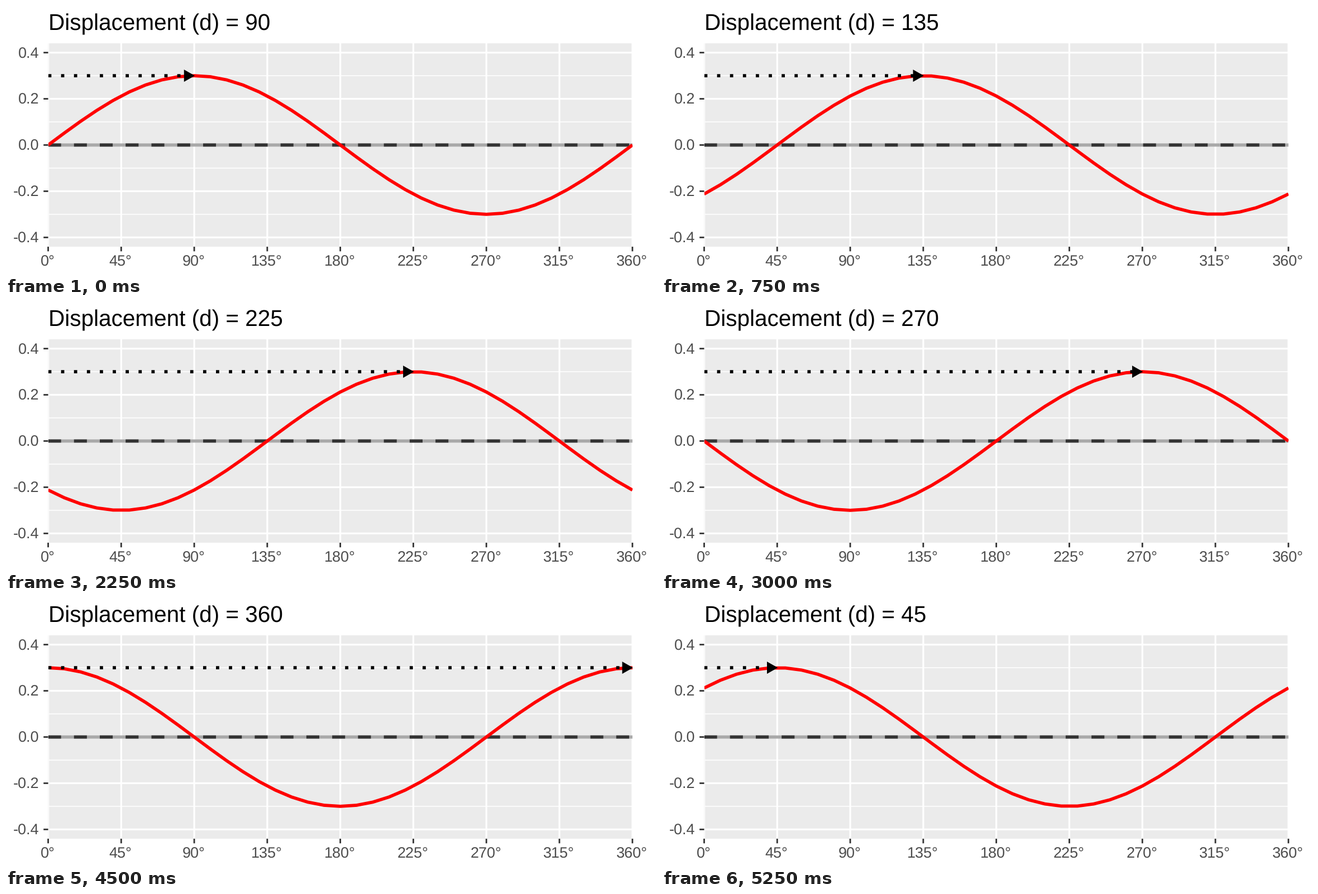
Animation of 1164x481 px, one loop 6000 ms. Source, as a matplotlib script:

```python
import numpy as np
import matplotlib.pyplot as plt
from matplotlib.animation import FuncAnimation
from matplotlib.patches import Polygon, Rectangle

W, H, DPI = 1164, 481, 64
PT = 72 / DPI  # points per pixel
LEFT, RIGHT, TOP, BOTTOM = 75.5, 1121.8, 67, 432
MID = (TOP + BOTTOM) / 2
AMP = 0.3
LINE = 5.78
GRID = 3.2
TICK = 8.3
STEP, FRAMES = 45, 8

plt.rcParams["font.family"] = "Liberation Sans"
plt.rcParams["text.hinting"] = "no_hinting"
plt.rcParams["path.snap"] = False


def px(deg):
    return LEFT + deg * (RIGHT - LEFT) / 360


def py(value):
    return MID - value * 414.6


fig = plt.figure(figsize=(W / DPI, H / DPI), dpi=DPI, facecolor="white")
ax = fig.add_axes([0, 0, 1, 1])
ax.set_xlim(0, W)
ax.set_ylim(H, 0)
ax.axis("off")

panel = Rectangle((LEFT, TOP), RIGHT - LEFT, BOTTOM - TOP, fc="#EBEBEB", lw=0)
ax.add_patch(panel)


def line(xs, ys, color, width, z, clip=True, **kw):
    art, = ax.plot(xs, ys, color=color, lw=width * PT, zorder=z,
                   solid_capstyle="butt", dash_capstyle="butt", **kw)
    if clip:
        art.set_clip_path(panel)
    return art


def label(x, y, text, size, color, ha):
    return ax.text(x, y, text, fontsize=size * PT, color=color,
                   ha=ha, va="baseline")


# Grid, ticks and axis labels
for v in (-0.3, -0.1, 0.1, 0.3):
    line([LEFT, RIGHT], [py(v)] * 2, "white", GRID / 2, 2)

for v in (-0.4, -0.2, 0.0, 0.2, 0.4):
    y = py(v)
    line([LEFT, RIGHT], [y, y], "white", GRID, 3)
    line([LEFT - TICK, LEFT], [y, y], "#333333", 2.8, 3, clip=False)
    label(59, y + 9.6, f"{v:.1f}", 27, "#4D4D4D", "right")

for deg in range(0, 361, STEP):
    x = px(deg)
    line([x, x], [TOP, BOTTOM], "white", GRID, 3)
    line([x, x], [BOTTOM, BOTTOM + TICK], "#333333", 2.8, 3, clip=False)
    label(x - 1, 467, f"{deg}°", 27, "#4D4D4D", "center")

# Zero line
line([LEFT, RIGHT], [MID, MID], "#A9A9A9", LINE, 4)
line([LEFT, RIGHT], [MID, MID], "#333333", LINE, 5, ls=(0, (4, 4)))

# Moving parts
degs = np.arange(0, 361, 10)
wave = line([], [], "red", LINE, 6)
dots = line([], [], "black", LINE, 7, ls=(0, (1, 3)))
head = Polygon([(0, 0)] * 3, fc="black", lw=0, zorder=8)
ax.add_patch(head)
head.set_clip_path(panel)
title = label(LEFT, 43.3, "", 40.5, "black", "left")


def draw(i):
    d = (90 + STEP * i - 1) % 360 + 1
    wave.set_data(px(degs), py(AMP * np.cos(np.radians(degs - d))))
    tip, y = px(d), py(AMP)
    dots.set_data([LEFT, tip - 5], [y, y])
    head.set_xy([(tip + 1, y), (tip - 18.3, y - 11), (tip - 18.3, y + 11)])
    title.set_text(f"Displacement (d) = {d}")
    return wave, dots, head, title


anim = FuncAnimation(fig, draw, frames=FRAMES, init_func=lambda: draw(0),
                     interval=750, repeat=True, repeat_delay=0)
plt.show()
```
